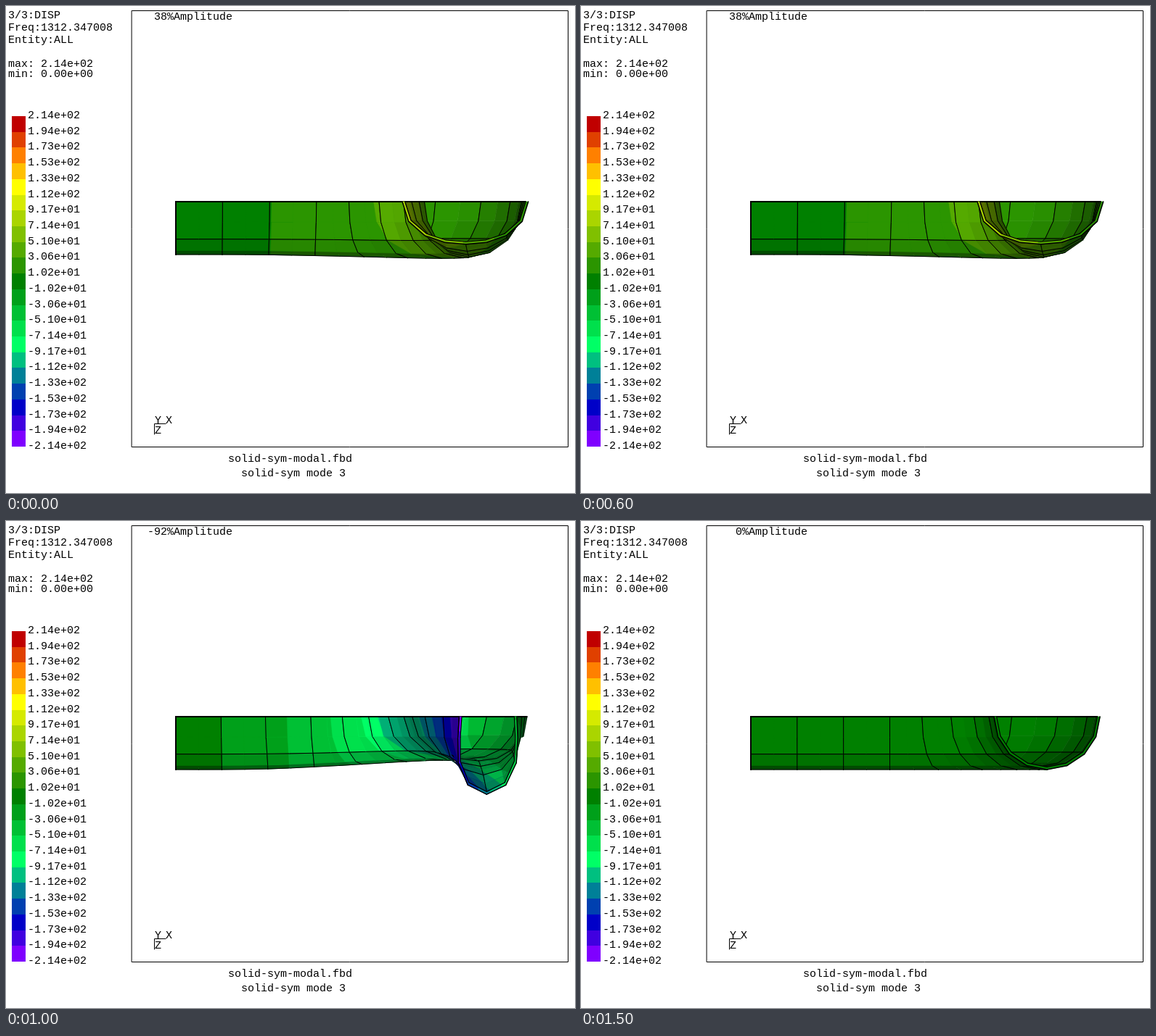
An HTML page with a canvas that plays this animation: 784x672 px, repeating every 1600 ms.

```html
<!DOCTYPE html>
<html lang="en">
<head>
<meta charset="utf-8">
<title>Mode shape</title>
<style>
  html, body { margin: 0; width: 100%; height: 100%; overflow: hidden; background: #fff; }
  canvas { display: block; }
</style>
</head>
<body>
<canvas id="stage" width="784" height="672"></canvas>
<script>
const ctx = document.getElementById('stage').getContext('2d');

const MAX = 214.06;
const BANDS = ('7f00ff 4000e0 0000c8 0040b0 008098 00c080 00ff66 00e04c 00c034 00a01a 008000 ' +
  '2b9500 55aa00 80c000 aad500 d5ea00 ffff00 ffc000 ff8000 e04000 c00000').split(' ')
  .map(hex => [0, 2, 4].map(k => parseInt(hex.substr(k, 2), 16)));
const BAND_SIZE = 2 * MAX / BANDS.length;

// Pipe: straight run, 90 degree elbow towards the viewer, straight stub.
const LEFT = 234, AXIS_Y = 270, BEND_X = 425.5;
const BEND_R = 216.5, OUTER = 73, INNER = 69.4;
const STEPS = 22, BEND_START = 6, BEND_END = 16, ARCS = 8;

// Unit mode shape per section: x shift at intrados, bottom, extrados;
// z shift at bottom; magnitude at intrados, bottom, extrados.
const MODE = [
  [0, 0, 0, 0, 0, 0, 0],
  [1.6, .5, -1.6, 0, 11, 11, 11],
  [4.5, 1, -4, 1, 26, 26, 26],
  [6, 1, -5, 4, 42, 42, 42],
  [7, 2, -5, 8, 64, 58, 56],
  [11, 1, -5, 12, 84, 68, 58],
  [16, -1, -6, 14, 118, 72, 52],
  [15, -4, -7, 12, 116, 82, 40],
  [10, -10, -3, 9, 115, 86, 36],
  [-9, -13, 0, 1, 130, 92, 32],
  [-36, -17, 5, -12, 170, 105, 30],
  [-60, -22, 12, -37, 214, 128, 32]
];

function modeAt(step) {
  const k = step >> 1;
  if (step % 2 === 0) return MODE[k];
  const row = n => MODE[Math.max(0, Math.min(MODE.length - 1, n))];
  return MODE[k].map((v, c) => (9 * (v + row(k + 1)[c]) - row(k - 1)[c] - row(k + 2)[c]) / 16);
}

function makeNode(step, arc, radius) {
  const bend = Math.max(0, Math.min(BEND_END, step) - BEND_START) * Math.PI / 20;
  const phi = arc * Math.PI / ARCS, c = Math.cos(phi), s = Math.sin(phi);
  const reach = BEND_R - radius * c;
  const [xi, xb, xe, zb, mi, mb, me] = modeAt(step);
  return {
    x: step < BEND_START ? LEFT + step * (BEND_X - LEFT) / BEND_START : BEND_X + reach * Math.sin(bend),
    y: AXIS_Y + radius * s,
    depth: BEND_R - reach * Math.cos(bend) + 32 * Math.max(0, step - BEND_END),
    ux: xb + (xi - xe) / 2 * c ** 3 + ((xi + xe) / 2 - xb) * c * c,
    uy: zb * s ** 3,
    mag: mb + (mi - me) / 2 * c + ((mi + me) / 2 - mb) * c * c
  };
}

const makeShell = radius => Array.from({ length: STEPS + 1 }, (_, step) =>
  Array.from({ length: ARCS + 1 }, (_, arc) => makeNode(step, arc, radius)));

const outer = makeShell(OUTER), inner = makeShell(INNER);
const faces = [];

// Line widths follow the four sides; 0 hides a side.
function addFace(nodes, widths, side) {
  const depth = nodes.reduce((sum, n) => sum + n.depth, 0) / 4;
  faces.push({ nodes, widths, side, depth });
}

const hoopWidth = step => step === 0 ? 2 : step === STEPS ? 1.5 : step % 2 ? 0 : 1;
const axialWidth = arc => arc === 0 || arc === ARCS ? 2 : arc % 2 ? 0 : 1;

for (const [shell, side] of [[outer, 1], [inner, -1]]) {
  for (let j = 0; j < STEPS; j++) {
    for (let i = 0; i < ARCS; i++) {
      addFace([shell[j][i], shell[j + 1][i], shell[j + 1][i + 1], shell[j][i + 1]],
        [axialWidth(i), hoopWidth(j + 1), axialWidth(i + 1), hoopWidth(j)], side);
    }
  }
}
for (let i = 0; i < ARCS; i++) {
  const a = outer[STEPS], b = inner[STEPS];
  addFace([a[i], b[i], b[i + 1], a[i + 1]], [0, 1.2, 0, 1.5], 0);
}
faces.sort((a, b) => a.depth - b.depth);

const bandOf = v => Math.max(0, Math.min(BANDS.length - 1, Math.floor((v + MAX) / BAND_SIZE)));

function clipAbove(points, level) {
  const out = [];
  points.forEach((p, k) => {
    const q = points[(k + 1) % points.length];
    if (p.v >= level) out.push(p);
    if ((p.v >= level) !== (q.v >= level)) {
      const t = (level - p.v) / (q.v - p.v);
      out.push({ x: p.x + t * (q.x - p.x), y: p.y + t * (q.y - p.y), v: level });
    }
  });
  return out;
}

function fillPolygon(points, color) {
  ctx.beginPath();
  points.forEach(p => ctx.lineTo(p.x, p.y));
  ctx.closePath();
  ctx.fillStyle = ctx.strokeStyle = color;
  ctx.lineWidth = .6;
  ctx.fill();
  ctx.stroke();
}

function drawFace(face, amp) {
  const pts = face.nodes.map(n => ({
    x: n.x + amp * n.ux, y: n.y + amp * n.uy, z: n.depth, v: amp * n.mag
  }));
  const diff = (p, q) => [q.x - p.x, q.y - p.y, q.z - p.z];
  const [ax, ay, az] = diff(pts[0], pts[2]);
  const [bx, by, bz] = diff(pts[1], pts[3]);
  const facing = ax * by - ay * bx;
  if (face.side && facing * face.side < .5) return;

  const length = Math.hypot(facing, ay * bz - az * by, az * bx - ax * bz) || 1;
  const light = face.side ? Math.min(1, .42 + .85 * Math.abs(facing) / length) : 1;
  const values = pts.map(p => p.v);
  const low = bandOf(Math.min(...values)), high = bandOf(Math.max(...values));
  for (let band = low; band <= high; band++) {
    const part = band === low ? pts : clipAbove(pts, band * BAND_SIZE - MAX);
    if (part.length > 2) {
      fillPolygon(part, `rgb(${BANDS[band].map(c => Math.round(c * light))})`);
    }
  }

  ctx.strokeStyle = '#000';
  face.widths.forEach((width, k) => {
    if (!width) return;
    const p = pts[k], q = pts[(k + 1) % 4];
    ctx.lineWidth = width;
    ctx.beginPath();
    ctx.moveTo(p.x, p.y);
    ctx.lineTo(q.x, q.y);
    ctx.stroke();
  });
}

function text(str, x, y) {
  ctx.fillStyle = '#000';
  ctx.fillText(str, x, y);
}

function scientific(v) {
  const [mantissa, exponent] = v.toExponential(2).split('e');
  return `${mantissa}e${exponent[0]}${exponent.slice(1).padStart(2, '0')}`;
}

function drawLegend() {
  const step = 456 / BANDS.length, count = BANDS.length;
  BANDS.forEach((rgb, k) => {
    const top = Math.round(152 + (count - 1 - k) * step);
    ctx.fillStyle = `rgb(${rgb})`;
    ctx.fillRect(8, top, 19, Math.round(152 + (count - k) * step) - top);
  });
  for (let k = 0; k <= count; k++) {
    text(scientific(MAX - k * BAND_SIZE), 30, Math.round(155 + k * step));
  }
}

function drawLabels(amp) {
  text('3/3:DISP', 3, 17);
  text('Freq:1312.347008', 3, 34);
  text('Entity:ALL', 3, 51);
  text('max: 2.14e+02', 3, 84);
  text('min: 0.00e+00', 3, 98);
  text('solid-sym-modal.fbd', 306, 629);
  text('solid-sym mode 3', 324, 649);
  const percent = String(Math.trunc(amp * 100 + Math.sign(amp) * 1e-6) || 0);
  text(percent + '%Amplitude', 186 + 9 * (4 - percent.length), 19);
  text('Y', 205, 576);
  text('X', 220, 576);
  text('Z', 205, 590);
}

function drawFrameLines() {
  ctx.strokeStyle = '#000';
  ctx.lineWidth = 1;
  ctx.strokeRect(173.5, 6.5, 601, 602);
  ctx.beginPath();
  ctx.moveTo(204.5, 591);
  ctx.lineTo(204.5, 576.5);
  ctx.lineTo(220, 576.5);
  ctx.stroke();
}

function draw(time) {
  const tick = Math.floor(time / 100) % 16;
  const amp = Math.sin((tick + 1) * Math.PI / 8);
  ctx.fillStyle = '#fff';
  ctx.fillRect(0, 0, 784, 672);
  drawFrameLines();
  drawLegend();
  drawLabels(amp);
  faces.forEach(face => drawFace(face, amp));
}

ctx.font = '15px "Liberation Mono", monospace';
ctx.lineJoin = ctx.lineCap = 'round';

const start = performance.now();
function loop() {
  draw(performance.now() - start);
  requestAnimationFrame(loop);
}
loop();
</script>
</body>
</html>
```
